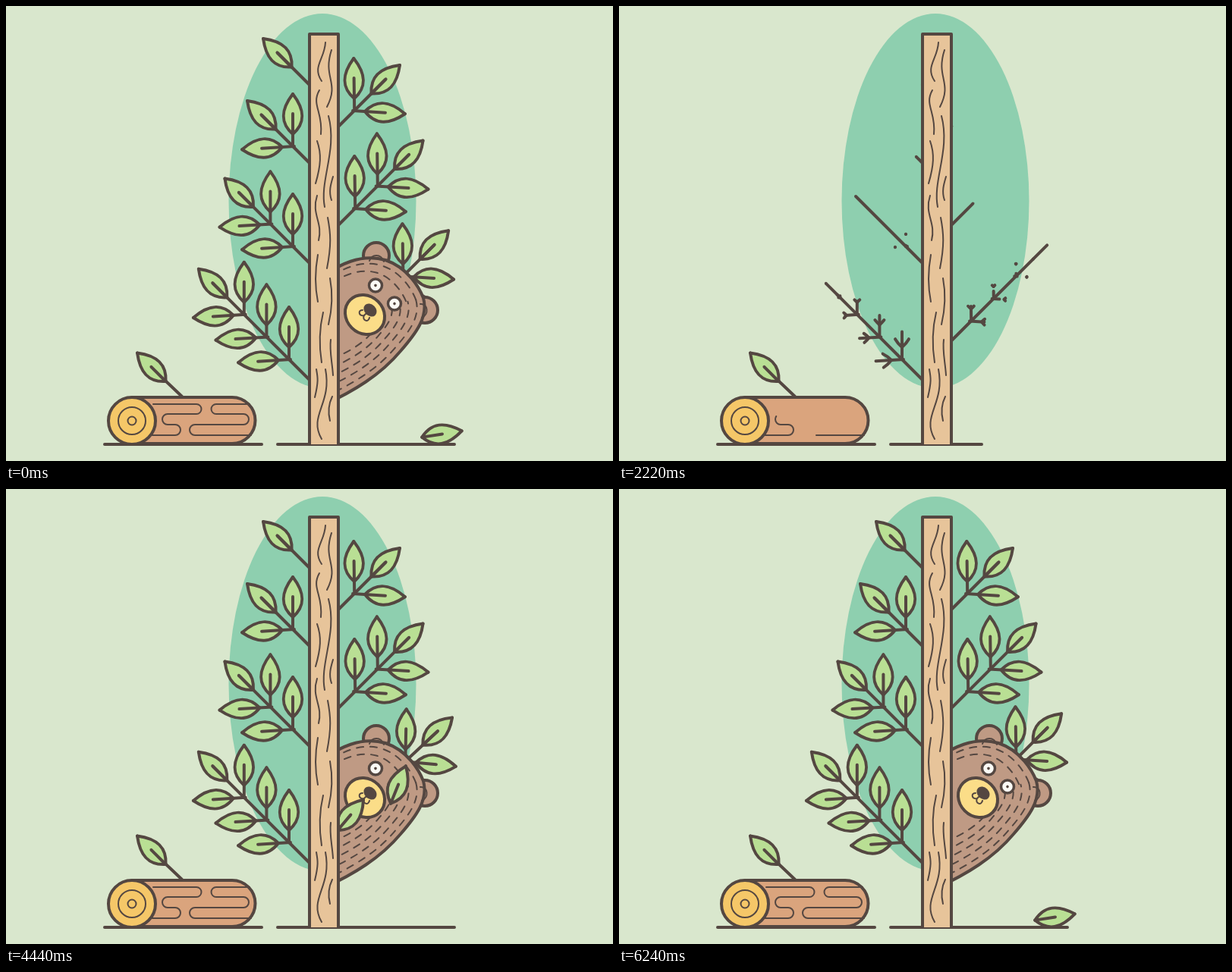
An HTML page with a canvas that plays this animation: 800x600 px, repeating every 9.42 s.

```html
<!DOCTYPE html>
<html lang="en">
<head>
<meta charset="utf-8">
<title>Bear behind the tree</title>
<style>
html, body { margin: 0; width: 100%; height: 100%; overflow: hidden; background: #d9e7cd; }
canvas { display: block; width: 800px; height: 600px; }
</style>
</head>
<body>
<canvas id="stage" width="800" height="600"></canvas>
<script>
const ctx = document.getElementById('stage').getContext('2d');
const LOOP = 9420, STEP = 30, SHAKE = 3790, DROP = 4100;
const INK = '#544741', BARK = '#e7c49a', LEAF = '#b9df94', FUR = '#bf9a84';
const RAD = Math.PI / 180, TAU = Math.PI * 2;

const clamp = v => Math.max(0, Math.min(1, v));
const span = (t, start, dur) => clamp((t - start) / dur);
const inOut = p => p < 0.5 ? 2 * p * p : 1 - 2 * (1 - p) * (1 - p);
const outQuad = p => 1 - (1 - p) * (1 - p);
const backOut = (p, s) => 1 + (p - 1) ** 2 * ((s + 1) * (p - 1) + s);

const paths = new Map();
function pathOf(d) {
  if (!paths.has(d)) {
    const el = document.createElementNS('http://www.w3.org/2000/svg', 'path');
    el.setAttribute('d', d);
    paths.set(d, { shape: new Path2D(d), len: el.getTotalLength() });
  }
  return paths.get(d);
}

// Strokes the first part p of a path.
function trace(d, p, width = 4, color = INK) {
  if (p <= 0) return;
  const { shape, len } = pathOf(d);
  ctx.setLineDash(p < 1 ? [len * p + 0.01, len + 10] : []);
  ctx.lineWidth = width;
  ctx.strokeStyle = color;
  ctx.stroke(shape);
  ctx.setLineDash([]);
}

function fill(d, color) {
  ctx.fillStyle = color;
  ctx.fill(pathOf(d).shape);
}

function oval(x, y, rx, ry, rot, color, width) {
  ctx.beginPath();
  ctx.ellipse(x, y, rx, ry, rot, 0, TAU);
  if (color) {
    ctx.fillStyle = color;
    ctx.fill();
  }
  if (width) {
    ctx.lineWidth = width;
    ctx.strokeStyle = INK;
    ctx.stroke();
  }
}

function at(x, y, angle, draw) {
  ctx.save();
  ctx.translate(x, y);
  ctx.rotate(angle * RAD);
  draw();
  ctx.restore();
}

// Leaves: base at the local origin, tip along +x.
const UPPER = 'M0 0C15 -17 32 -16 53 0', LOWER = 'M0 0C15 17 32 16 53 0';
const BLADE = UPPER + 'C32 16 15 17 0 0Z';

function leaf(x, y, angle, age, stem) {
  if (age <= 0) return;
  at(x, y, angle, () => {
    const grow = inOut(span(age, 220, 650));
    if (grow > 0) {
      ctx.save();
      ctx.translate(27, 0);
      ctx.scale(grow, grow);
      ctx.translate(-27, 0);
      fill(BLADE, LEAF);
      ctx.restore();
    }
    trace(stem, inOut(span(age, 0, 400)));
    const edge = inOut(span(age, 30, 760));
    if (age > 30) {
      trace(UPPER, Math.max(edge, 0.001));
      trace(LOWER, Math.max(edge, 0.001));
    }
  });
}

const STALK = 'M-16 0L27 0', VEIN = 'M0 0L27 0';

// x, y: first fork; pairs: forks; start: branch growth; sprout: first leaf
const branches = [
  { side: -1, x: 373, y: 466, pairs: 3, start: 1355, sprout: 1930 },
  { side: 1, x: 464, y: 415.5, pairs: 3, start: 1420, sprout: 2030, pushed: true },
  { side: -1, x: 378, y: 317, pairs: 2, start: 1715, sprout: 2170 },
  { side: 1, x: 460, y: 267, pairs: 2, start: 1985, sprout: 2300 },
  { side: -1, x: 378, y: 185, pairs: 1, start: 2067, sprout: 2400 },
  { side: 1, x: 459, y: 138, pairs: 1, start: 2190, sprout: 2480 },
  { side: -1, x: 399, y: 103, pairs: 0, start: 2205, sprout: 2580 }
];

function branch(b, t) {
  if (t < b.start) return;
  const { side } = b;
  const root = side < 0 ? 400 : 438;
  const rise = Math.max(0, b.pairs - 1) * 29.6;
  const lastX = b.x + side * rise, lastY = b.y - rise;
  const pivotY = b.y + Math.abs(b.x - root);
  ctx.save();
  if (b.pushed) {
    ctx.translate(root, pivotY);
    ctx.rotate(swing(t) * RAD);
    ctx.translate(-root, -pivotY);
  }
  const tipAngle = side < 0 ? -135 : -45;
  leaf(lastX + side * 22.5, lastY - 22.5, tipAngle, t - b.sprout - b.pairs * 55, VEIN);
  trace(`M${root} ${pivotY}L${lastX + side * 41} ${lastY - 41}`, inOut(span(t, b.start, 600)));
  for (let i = 0; i < b.pairs; i++) {
    const x = b.x + side * i * 29.6, y = b.y - i * 29.6;
    const age = t - b.sprout - i * 55;
    const lost = b.pushed && i < 2 && t >= SHAKE;
    if (!lost) leaf(x, y - 16, side < 0 ? -90 : -90.8, age, STALK);
    leaf(x + side * 14, y + 1, side < 0 ? 176.5 : 3.5, age, STALK);
  }
  ctx.restore();
}

// Damped sway of the branch pushed by the bear, in degrees.
function swing(t) {
  const s = t - SHAKE;
  if (s <= 0) return 0;
  return 17 * Math.exp(-0.00068 * s) * Math.sin(Math.PI * s / 690) * clamp((5790 - t) / 500);
}

// Smooth curve through keys [time, x, y, angle].
function follow(keys, t) {
  const last = keys.length - 1;
  if (t >= keys[last][0]) return keys[last].slice(1);
  let i = 0;
  while (t >= keys[i + 1][0]) i++;
  const a = keys[i], b = keys[i + 1], dt = b[0] - a[0], u = (t - a[0]) / dt;
  const slope = (k, c) => k === 0 || k === last ? 0
    : (keys[k + 1][c] - keys[k - 1][c]) / (keys[k + 1][0] - keys[k - 1][0]);
  return [1, 2, 3].map(c =>
    (2 * u ** 3 - 3 * u * u + 1) * a[c] + (3 * u * u - 2 * u ** 3) * b[c] +
    dt * ((u ** 3 - 2 * u * u + u) * slope(i, c) + (u ** 3 - u * u) * slope(i + 1, c)));
}

const falling = [
  { x: 463, y: 372, keys: [[DROP, 478, 377, -77], [4440, 454, 430, -50],
    [5190, 539, 478, 155], [5740, 567, 540, 285], [6240, 574.5, 564.5, 351]] },
  { x: 492, y: 343, keys: [[DROP, 514, 355, -77], [4440, 517, 390, -68],
    [5190, 691, 490, 118], [5850, 832, 522, 270]] }
];

function fallingLeaf(f, t) {
  if (t < SHAKE) return;
  let x, y, angle;
  if (t < DROP) {
    const a = swing(t) * RAD, dx = f.x - 438, dy = f.y - 441;
    x = 438 + dx * Math.cos(a) - dy * Math.sin(a);
    y = 441 + dx * Math.sin(a) + dy * Math.cos(a);
    angle = -90 + swing(t);
  } else {
    [x, y, angle] = follow(f.keys, t);
  }
  at(x, y, angle, () => {
    ctx.translate(-26.5, 0);
    leaf(0, 0, 0, 5000, VEIN);
  });
}

const CROWN = 'M410 361C440 340 468 326 500 335C530 345 545 372 550 385';
const CHEEK = 'C557 410 540 432 520 455C495 485 460 508 410 530';
const HEAD = CROWN + CHEEK, JAW = 'M550 385' + CHEEK;

function furRow(d, scale, shift) {
  ctx.save();
  ctx.translate(452, 408);
  ctx.scale(scale, scale);
  ctx.translate(-452, -408);
  ctx.lineWidth = 2 / scale;
  ctx.strokeStyle = INK;
  ctx.setLineDash([9 / scale, 9 / scale]);
  ctx.lineDashOffset = shift;
  ctx.stroke(pathOf(d).shape);
  ctx.restore();
}

function eye(x, y, open) {
  ctx.save();
  ctx.translate(x, y);
  ctx.rotate(45 * RAD);
  ctx.scale(1, Math.max(open, 0.12));
  oval(0, 0, 8.5, 8.5, 0, '#fbfaf5', 3.5);
  oval(0, 0, 1.8, 1.8, 0, INK);
  ctx.restore();
}

function bear(t) {
  if (t < SHAKE) return;
  const out = backOut(span(t, SHAKE, 380), 1.1);
  ctx.save();
  ctx.beginPath();
  ctx.rect(420, 0, 380, 600);
  ctx.clip();
  ctx.translate(-150 * (1 - out), 0);
  oval(488, 329, 17, 17, 0, FUR, 4);
  oval(552, 401, 17, 17, 0, FUR, 4);
  fill(HEAD, FUR);
  trace(HEAD, 1);
  trace('M479 336C482 327 494 326 498 337', 1, 2);
  trace('M546 393C556 392 558 407 548 411', 1, 2);
  furRow(CROWN, 0.9, 0);
  furRow(CROWN, 0.77, 7);
  [0.9, 0.79, 0.68, 0.57, 0.46].forEach((s, i) => furRow(JAW, s, i * 8));
  oval(473, 407, 27.5, 24.5, 45 * RAD, '#fbdd88', 4);
  oval(480, 401, 9.5, 7.5, 45 * RAD, INK);
  trace('M475 405L471.500 408.500', 1, 2);
  trace('M470 401C464 401 464 408 471.500 408.500C470 416 478 417 479 411', 1, 2);
  const open = Math.abs(span(t, 5850, 210) * 2 - 1);
  eye(487, 368.5, open);
  eye(512, 392.5, open);
  ctx.restore();
}

const grain = [
  'M416 99C403 80 420 70 421 48', 'M423 133C440 100 417 95 429 58',
  'M415 169C418 140 402 130 413 111', 'M420 265C413 230 437 190 425 145',
  'M408 234C415 210 416 195 410 178', 'M429 256C425 245 428 235 431 225',
  'M412 309C418 285 402 275 410 250', 'M423 346C429 315 428 300 424 279',
  'M411 390C407 370 407 350 411 328', 'M425 420C431 395 430 375 427 359',
  'M416 470C412 445 413 425 418 404', 'M431 487C430 470 426 455 428 440',
  'M407 516C412 495 411 490 409 479', 'M416 571C398 540 430 525 421 479',
  'M427 547C424 535 425 525 430 515'
].map(d => ({ d, y: +d.match(/M\d+ (\d+)/)[1] }));

// Vertical reveal: clear above y, solid from y + 36 down.
function rising(y, rgb) {
  const g = ctx.createLinearGradient(0, y, 0, y + 36);
  g.addColorStop(0, `rgba(${rgb},0)`);
  g.addColorStop(1, `rgba(${rgb},1)`);
  return g;
}

function trunk(t) {
  const rise = (start, dur) => 580 - 580 * outQuad(span(t, start, dur));
  if (t > 1137) {
    ctx.fillStyle = rising(rise(1137, 1035), '231,196,154');
    ctx.fillRect(400, 37, 38, 541);
  }
  for (const { d, y } of grain) {
    trace(d, inOut(span(t, 1425 - (y - 390) * 1.5, 280)), 2);
  }
  if (t > 1000) trace('M400 578L400 37L438 37L438 578', 1, 4, rising(rise(1000, 1035), '84,71,65'));
}

const BODY = 'M166 516L298 516A30.500 30.500 0 0 1 298 577L166 577';
const RIM = 'M197 547A31 31 0 1 1 135 547A31 31 0 1 1 197 547';
const knots = [
  { d: 'M192 566L223 566A7 7 0 0 0 223 552L213 552A7 7 0 0 1 213 538L251 538A6.500 6.500 0 0 0 251 525L194 525', start: 1410, dur: 1460 },
  { d: 'M323 566L249 566A7 7 0 0 1 249 552L313 552A7 7 0 0 0 313 538L277 538A6.500 6.500 0 0 1 277 525L321 525', start: 1750, dur: 1200 }
];

function log(t) {
  const sprout = 1300;
  trace('M232 515L192 477', inOut(span(t, sprout, 400)));
  leaf(210.500, 495, -135, t - sprout, VEIN);

  const tint = span(t, 1500, 740);
  if (tint > 0) {
    const x = 135 + 255 * tint;
    const g = ctx.createLinearGradient(x - 60, 0, x, 0);
    g.addColorStop(0, '#daa47d');
    g.addColorStop(1, 'rgba(218,164,125,0)');
    fill(BODY, g);
  }
  for (const k of knots) trace(k.d, span(t, k.start, k.dur) ** 1.6, 2);
  trace(BODY, inOut(span(t, 800, 600)));

  const disc = outQuad(span(t, 850, 450));
  if (disc > 0) oval(166, 547, 31 * disc, 31 * disc, 0, '#f5c768');
  trace(RIM, inOut(span(t, 700, 580)));
  const ring = inOut(span(t, 900, 480));
  for (const r of [18, 5.5]) {
    trace(`M${166 + r} 547A${r} ${r} 0 1 1 ${166 - r} 547A${r} ${r} 0 1 1 ${166 + r} 547`, ring, 2);
  }
}

function ground(t) {
  const p = inOut(span(t, 0, 850));
  trace('M130 578L337 578', p);
  const end = 358 + 120 * p + 113 * inOut(span(t, 3750, 200));
  ctx.lineWidth = 4;
  ctx.strokeStyle = INK;
  ctx.beginPath();
  ctx.moveTo(358, 578);
  ctx.lineTo(end, 578);
  ctx.stroke();
}

function crown(t) {
  const p = span(t, 1310, 600);
  if (p <= 0) return;
  const s = Math.max(0, backOut(p, 1.1));
  oval(417, 504 - 247 * s, 123.5 * s, 247 * s, 0, '#8ecfaf');
}

function scene(t) {
  ctx.fillStyle = '#d9e7cd';
  ctx.fillRect(0, 0, 800, 600);
  ctx.lineCap = ctx.lineJoin = 'round';
  crown(t);
  ground(t);
  branches.forEach(b => branch(b, t));
  bear(t);
  falling.forEach(f => fallingLeaf(f, t));
  trunk(t);
  log(t);
}

const began = performance.now();
function tick() {
  const t = Math.floor((performance.now() - began) % LOOP / STEP) * STEP;
  scene(t === 0 ? LOOP : t);
  requestAnimationFrame(tick);
}
tick();
</script>
</body>
</html>
```
